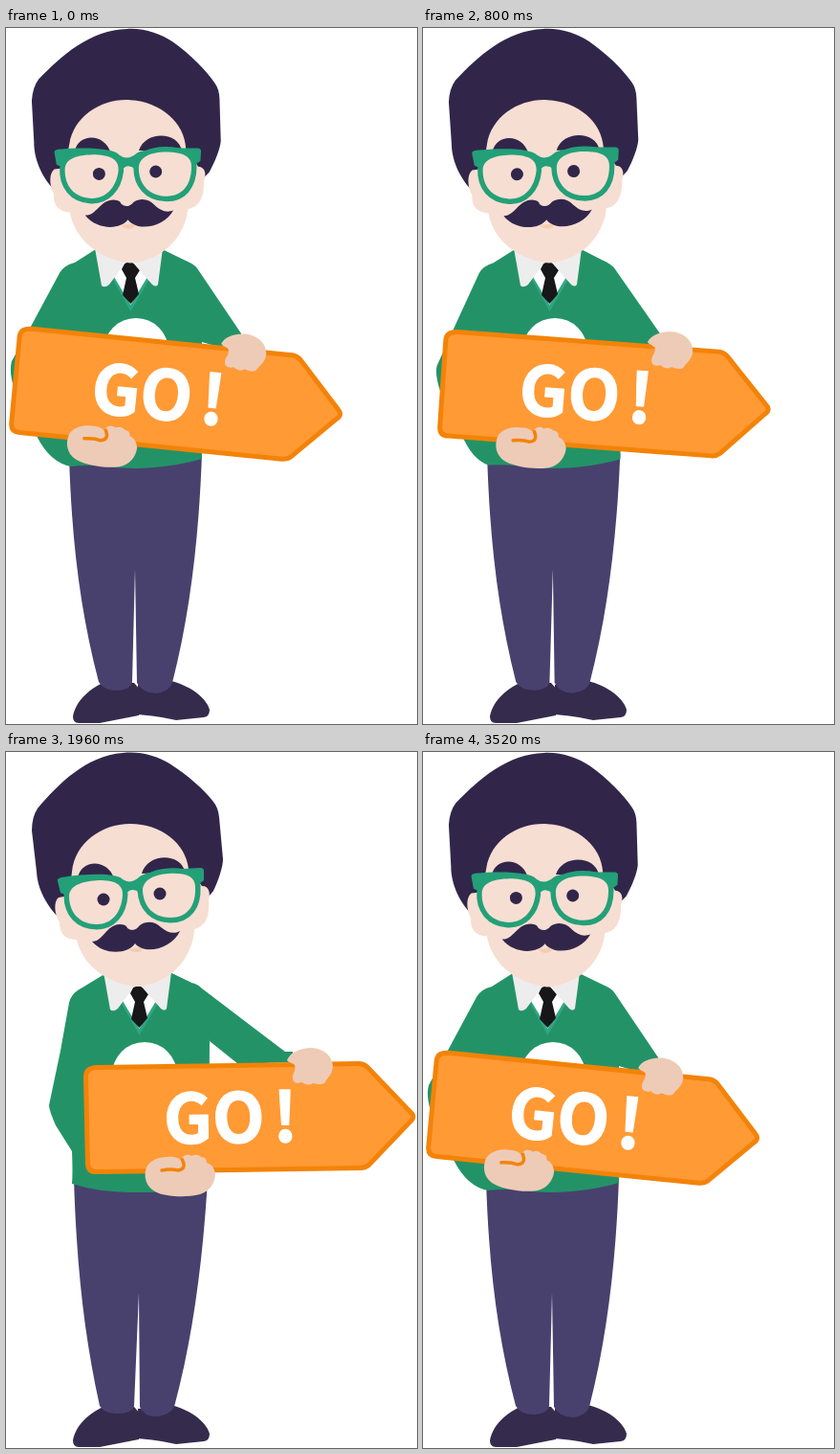
Recreate the animation shown at these times as an HTML page. Size 430 by 727 pixels, loop 4.48 s.

```html
<!DOCTYPE html>
<html lang="en">
<head>
<meta charset="utf-8">
<title>Go</title>
<style>
html, body { margin: 0; width: 100%; height: 100%; overflow: hidden; background: #fff; }
svg { display: block; width: 430px; height: 727px; }
.dark { fill: #31264a; }
.skin { fill: #f7ded2; }
.hand { fill: #eecbb7; }
.green { fill: #239367; }
.frame { fill: #23a078; }
.lens { fill: #f7ded2; stroke: #23a078; stroke-width: 11; paint-order: stroke; }
text { font: 700 71px "Noto Sans CJK SC", "Open Sans", sans-serif; fill: #fff; stroke: #fff; stroke-width: 1.5; }
</style>
</head>
<body>
<svg viewBox="0 0 430 727">
  <g fill="#352b4c">
    <path d="M70 719C73 702 89 689 104 683L134 684L141 692Q141 708 139 718L98 726L76 726Q70 726 70 719Z"/>
    <path d="M138 686L172 682C190 686 209 698 213 712Q213 719 207 720L178 723C165 720 150 718 138 717Z"/>
  </g>
  <path id="legs" fill="#48416e"/>
  <path id="torso" class="green"/>
  <path id="arm" class="green"/>
  <g id="neck">
    <circle cx="145" cy="337" r="34" fill="#fff"/>
    <path d="M119 259L139.500 296L161 259L140 240Z" fill="#2fa682"/>
    <path d="M119 255L139.500 289L160 255L140 240Z" fill="#fff"/>
    <path d="M133 246Q139 243 143 246L149 253L144 261L148 278L139.500 288L131 279L135 261L130 252Z" fill="#17171a"/>
    <path d="M102 230L109 269Q112 272 117 268L134 245L140 243L162 268Q166 271 168 268L173 230Z" fill="#ededee"/>
  </g>
  <g id="head">
    <path class="dark" d="M122 1C141 -1 157 4 171 12C190 24 207 39 217 52Q222 58 223 68L227 112C227 120 222 135 217 145L200 165L60 177C45 165 33 145 32 125L27 82Q27 68 33 59C55 33 84 4 122 1Z"/>
    <path class="skin" d="M69 125C72 95 100 75 130 75C162 75 188 95 191 122L205 140C213 140 214 148 212 155C213 170 210 182 197 185C196 209 179 239 140 245C105 243 80 222 74 196C62 196 56 190 56 178C50 168 50 156 55 152L66 150Z"/>
    <path class="dark" d="M75 132C78 112 106 111 113 132ZM142 127C148 105 183 105 187 125Z"/>
    <path class="frame" d="M54 135Q53 132 58 131C85 127 115 126 122 133Q131 139 140 130C148 124 180 122 203 121Q207 121 207 124L207 134L202 138L190 140L142 138L140 147Q131 140 125 149L121 140L66 144L62 149L57 147Z"/>
    <path class="lens" d="M66 150C67 138 82 135 97 134C114 134 122 138 122 149C121 168 110 180 95 180C77 180 66 168 66 150Z"/>
    <path class="lens" d="M143 145C143 133 156 128 170 127C188 126 198 130 198 141C199 160 190 173 172 173C155 173 144 162 143 145Z"/>
    <circle id="eyeL" class="dark" r="6.500"/>
    <circle id="eyeR" class="dark" r="6.500"/>
    <path d="M128 206L146 203Q138 214 128 206Z" fill="#f3cdb2"/>
    <path class="dark" d="M90 198C102 198 104 181 119 180Q126 180 127 184Q134 189 140 181C147 176 156 177 162 183C168 188 175 191 182 187C176 200 160 208 146 206Q138 204 135 200C128 211 103 213 90 198Z"/>
  </g>
  <g id="sign">
    <path d="M95 329.500L369 325.500Q374 325.500 378 329L423 376Q429 381 423 386L380 431Q376 434.500 371 434.500L95 438.500Q86 439 85.500 430L83.500 339Q83.500 330 95 329.500Z" fill="#ff9a35" stroke="#f38308" stroke-width="5"/>
    <g transform="rotate(-.8 230 382)">
      <text x="165" y="408">GO</text>
      <text x="292" y="408" text-anchor="middle">!</text>
    </g>
    <path class="hand" d="M294 322C297 314 308 309 320 309C333 310 342 318 342 329C341 338 335 341 334 345C330 349 324 346 321 346C317 349 312 347 310 345C304 347 300 345 300 341C299 336 304 333 302 327C299 324 296 325 294 322Z"/>
    <path class="hand" d="M146 437C148 428 158 423 168 423C178 422 183 425 184 429Q183 422 188 421Q192 420 194 422Q200 419 204 423Q210 423 210 429Q217 431 219 440C219 450 213 459 203 462C187 466 169 464 160 461C149 457 144 448 146 437Z"/>
    <path d="M163 437Q173 435 180 437Q187 436 186 430L184.500 426" fill="none" stroke="#f38308" stroke-width="3.500" stroke-linecap="round"/>
  </g>
</svg>
<script>
const LOOP = 4480, STEP = 40;
const $ = id => document.getElementById(id);
const place = (id, value) => $(id).setAttribute("transform", value);

// Time and reach: 0 holds the sign close, 1 holds it out.
const reachKeys = [[480, 0], [680, .6], [790, .12], [960, .535], [1120, .97], [1160, 1], [3320, 1], [3520, 0]];
const blinks = [160, 2680];

// Each shape with the sign held close, then held out.
const shapes = {
  legs: [
    "M66 448C69 540 78 610 97 683Q102 692 116 692Q131 691 132 683L135 565L137 684Q143 695 157 695Q171 693 174 684C193 610 202 530 205 444Z",
    "M71 446C74 540 82 610 98 683Q104 692 118 691Q133 690 134 683L139 565L140 684Q145 695 158 694Q172 692 176 684C196 610 206 530 211 446Z"
  ],
  torso: [
    "M94 231L72 245Q60 248 56 256L28 308L6 348Q3 358 8 375L32 426Q46 454 68 458Q85 456 100 457C130 462 165 461 205 450L205 300L192 246L163 231Z",
    "M103 232L80 246Q68 252 66 262L57 312L45 369Q45 374 52 390L69 417Q70 440 69 451Q85 456 100 458C130 461 170 462 212 452L213 302L194 241L173 231Z"
  ],
  arm: [
    "M163 231L188 243Q196 246 200 251L246 319L246 330L225 334L205 328L180 300Z",
    "M173 231L194 241Q200 242 205 247L292 313L300 313L300 324L243 326L213 302L190 290Z"
  ]
};

function reach(t) {
  const i = reachKeys.findIndex(k => t < k[0]);
  if (i < 1) return 0;
  const [t0, a] = reachKeys[i - 1], [t1, b] = reachKeys[i];
  return a + (b - a) * (t - t0) / (t1 - t0);
}

function lid(t) {
  for (const b of blinks) {
    if (t >= b && t < b + 40) return .45;
    if (t >= b + 40 && t < b + 80) return .12;
  }
  return 1;
}

function mix([from, to], k) {
  const ends = to.match(/\d+/g);
  let i = 0;
  return from.replace(/\d+/g, n => (+n + (ends[i++] - n) * k).toFixed(2));
}

const shape = (id, k) => $(id).setAttribute("d", mix(shapes[id], k));

function draw(t) {
  const p = reach(t);
  const back = Math.pow(1 - p, 1.6), lean = 1 - back;
  shape("legs", lean);
  shape("torso", lean);
  shape("arm", Math.pow(p, 1.7));
  place("neck", `translate(${-9 * back} 0)`);
  place("head", `rotate(${3.5 * back} 126 78)`);
  place("sign", `translate(${-74.5 * (1 - p)} ${-17 * back}) rotate(${6.6 * back} 83 384)`);
  const open = lid(t);
  place("eyeL", `translate(102 154) scale(1 ${open})`);
  place("eyeR", `translate(161 148) scale(1 ${open})`);
}

const start = performance.now();
function tick() {
  const t = (performance.now() - start) % LOOP;
  draw(Math.floor(t / STEP) * STEP);
  requestAnimationFrame(tick);
}
tick();
</script>
</body>
</html>
```
